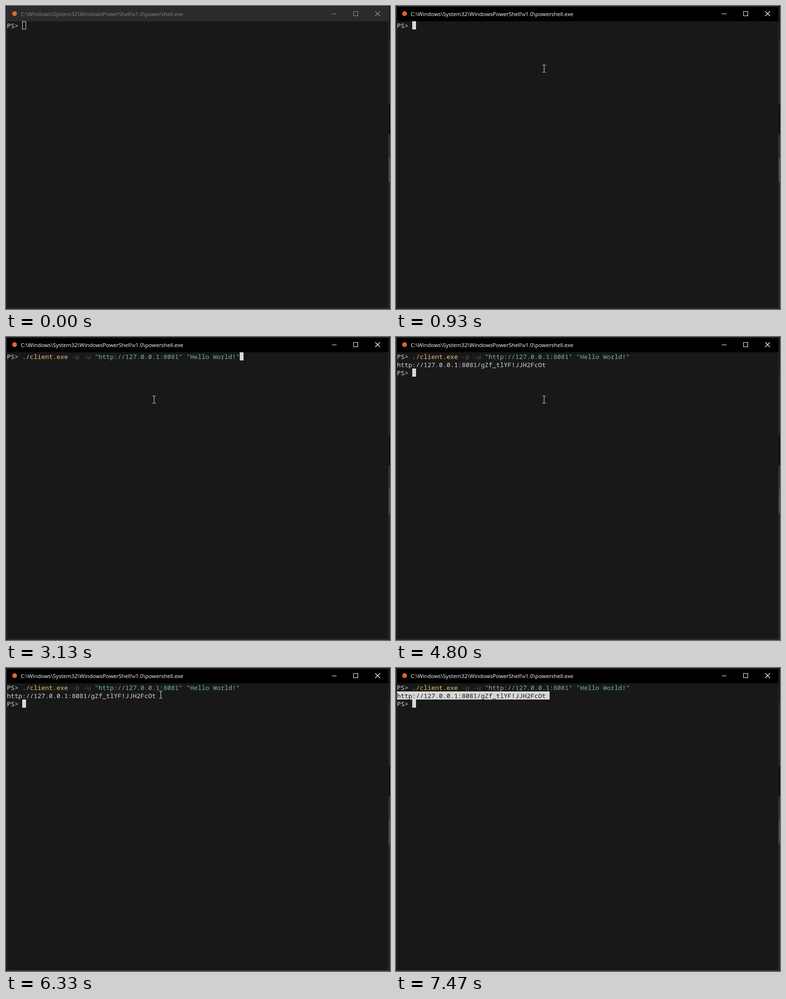
Write an HTML page with a canvas that moves like this. It is 805x634 px and loops after 8000 ms.

```html
<!DOCTYPE html>
<html lang="en">
<head>
<meta charset="utf-8">
<title>Terminal</title>
<style>
  html, body { margin: 0; width: 100%; height: 100%; overflow: hidden; background: #111; }
  canvas { display: block; }
</style>
</head>
<body>
<canvas id="stage" width="805" height="634"></canvas>
<script>
const ctx = document.getElementById('stage').getContext('2d', { alpha: false });

const LOOP = 8000;
const TICKS_PER_MS = 15 / 1000;
const CELL = 8, ROW = 17, LEFT = 2, TOP = 32;
const MONO = '13.333px "Noto Sans Mono", "DejaVu Sans Mono", monospace';
const SANS = '11.45px "Open Sans", "Noto Sans", sans-serif';
const BG = '#181818', FG = '#d8d8d8', YELLOW = '#f4bf75', GREY = '#585858', TEAL = '#75b5aa';

// Times of the state changes, in ticks
const FOCUS = 14, CLEAR = 44, COMMAND = 47, OUTPUT = 72, DRAG = 101;

const PROMPT = ['PS> ', FG];
const LINK = 'http://127.0.0.1:8081/gZf_tlYF!JJH2FcOt';
const COMMAND_LINE = [
  PROMPT, ['./client.exe ', YELLOW], ['-p -u ', GREY],
  ['"http://127.0.0.1:8081" "Hello World!"', TEAL]
];

// Pointer path: tick, x, y
const PATH = [
  [4, 84, 39], [6, 180, 72], [8, 270, 112], [10, 310, 131],
  [80, 310, 131], [82, 342, 96], [83, 358, 70], [84, 340, 48], [85, 260, 41],
  [87, 85, 54], [89, 6, 71],
  [91, 6, 71], [93, 190, 64], [95, 324, 56],
  [100, 324, 56], [101, 295, 57], [102, 205, 60], [103, 111, 62],
  [105, 66, 62], [108, 28, 61], [111, 5, 60], [112, -10, 60]
];

function fill(color, x, y, w, h) {
  ctx.fillStyle = color;
  ctx.fillRect(x, y, w, h);
}

function text(str, x, y, font, color) {
  ctx.font = font;
  ctx.fillStyle = color;
  ctx.fillText(str, x, y);
}

function pointerAt(tick) {
  if (tick < PATH[0][0]) return null;
  const next = PATH.findIndex(p => p[0] > tick);
  if (next < 0) return PATH[PATH.length - 1].slice(1);
  const [t0, x0, y0] = PATH[next - 1], [t1, x1, y1] = PATH[next];
  const k = (tick - t0) / (t1 - t0);
  return [Math.round(x0 + (x1 - x0) * k), Math.round(y0 + (y1 - y0) * k)];
}

function drawWindow(active) {
  fill('#101011', 0, 0, 805, 634);
  // Slivers of the desktop, also seen through the translucent window border
  fill('#1c1c1f', 802, 70, 3, 136);
  fill('#000', 802, 206, 3, 62);
  fill('#28282c', 802, 268, 3, 50);
  fill('#404046', 802, 318, 3, 51);
  fill('#1f1f22', 802, 369, 3, 265);

  fill('rgba(255, 255, 255, 0.15)', 1, 1, 802, 632);
  fill('#4a4647', 1, 632, 802, 1);
  fill(BG, 2, 2, 800, 630);
  fill(active ? '#000' : '#2b2b2b', 2, 2, 800, 30);

  ctx.fillStyle = '#e0662f';
  ctx.beginPath();
  ctx.arc(18, 16, 5, 0, Math.PI * 2);
  ctx.fill();

  text('C:\\Windows\\System32\\WindowsPowerShell\\v1.0\\powershell.exe',
    31, 21, SANS, active ? '#fff' : '#858585');
  const ink = active ? '#fff' : '#959595';
  fill(ink, 683, 16, 10, 1);
  ctx.strokeStyle = ink;
  ctx.lineWidth = 1;
  ctx.strokeRect(728.5, 11.5, 9, 9);
  ctx.lineWidth = 1.3;
  ctx.beginPath();
  ctx.moveTo(774, 11);
  ctx.lineTo(784, 21);
  ctx.moveTo(784, 11);
  ctx.lineTo(774, 21);
  ctx.stroke();
}

// Draws coloured runs on one row and returns the column after the last one
function drawLine(row, runs) {
  let col = 0;
  for (const [str, color] of runs) {
    text(str, LEFT + col * CELL, TOP + row * ROW + 14, MONO, color);
    col += str.length;
  }
  return col;
}

function drawCursor(row, col, active) {
  const x = LEFT + col * CELL, y = TOP + row * ROW;
  if (active) return fill(FG, x, y, CELL, ROW);
  ctx.strokeStyle = FG;
  ctx.lineWidth = 1;
  ctx.strokeRect(x + 0.5, y + 0.5, CELL - 1, ROW - 1);
}

function drawSelection(pointerX) {
  const end = LINK.length + 1;
  const start = Math.max(0, Math.round((pointerX - LEFT) / CELL));
  const x = LEFT + start * CELL, y = TOP + ROW;
  ctx.save();
  ctx.beginPath();
  ctx.rect(x, y, (end - start) * CELL, ROW);
  ctx.clip();
  fill(FG, x, y, (end - start) * CELL, ROW);
  drawLine(1, [[LINK, BG]]);
  ctx.restore();
}

function drawPointer(x, y) {
  ctx.save();
  ctx.globalCompositeOperation = 'difference';
  fill('#fff', x, y - 7, 1, 14);
  for (const edge of [y - 8, y + 7]) {
    fill('#fff', x - 3, edge, 3, 1);
    fill('#fff', x + 1, edge, 3, 1);
  }
  ctx.restore();
}

function draw(ms) {
  const tick = Math.floor((ms % LOOP + 4) * TICKS_PER_MS);
  const active = tick >= FOCUS;
  const pointer = pointerAt(tick);
  drawWindow(active);

  let row = 0, runs = [PROMPT];
  if (tick >= OUTPUT) {
    drawLine(0, COMMAND_LINE);
    drawLine(1, [[LINK, FG]]);
    row = 2;
  } else if (tick >= COMMAND) {
    runs = COMMAND_LINE;
  } else if (tick >= CLEAR) {
    runs = [PROMPT, ['clear', YELLOW]];
  }
  drawCursor(row, drawLine(row, runs), active);

  if (tick >= DRAG) drawSelection(pointer[0]);
  if (pointer) drawPointer(...pointer);
}

const began = performance.now();
function frame() {
  draw(performance.now() - began);
  requestAnimationFrame(frame);
}
frame();
</script>
</body>
</html>
```
